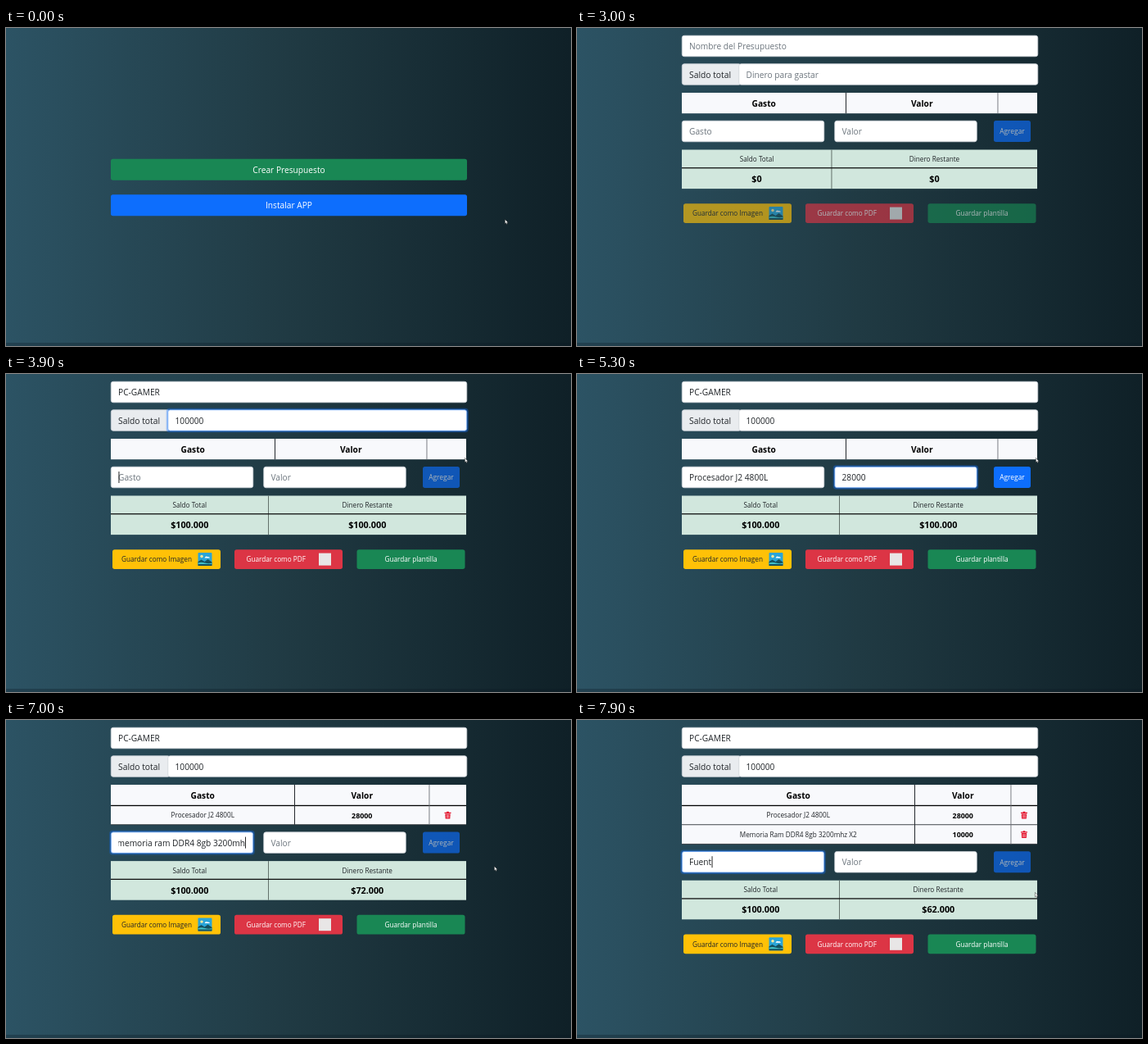
An HTML page for the animation above (8 s loop, 690 by 388 pixels).

```html
<!DOCTYPE html>
<html lang="es">
<head>
<meta charset="utf-8">
<title>Presupuesto</title>
<style>
html, body { margin: 0; width: 100%; height: 100%; overflow: hidden; background: #203a43; }
svg { display: block; width: 690px; height: 388px; font-family: "Open Sans", "Noto Sans", sans-serif; }
</style>
</head>
<body>
<svg id="stage" viewBox="0 0 690 388">
  <defs>
    <linearGradient id="bg">
      <stop offset="0" stop-color="#2c5364"/>
      <stop offset=".5" stop-color="#203a43"/>
      <stop offset="1" stop-color="#0f2027"/>
    </linearGradient>
  </defs>
  <rect width="690" height="388" fill="url(#bg)"/>
  <rect y="384" width="690" height="4" fill="#0b1a22" opacity=".3"/>
  <g id="view"></g>
</svg>
<script>
const LOOP = 8000, STEP = 100;
const BODY = 10.2, SMALL = 8.2, INK = '#212529', HINT = '#6c757d';
const LEFT = 128, RIGHT = 562, ROW_H = 23.6;
const view = document.getElementById('view');
const pen = document.createElement('canvas').getContext('2d');

// time, x, y of the pointer
const pointerPath = [
  [300, 610, 235], [1200, 338, 175], [1500, 338, 175], [1900, 330, 177], [3000, 330, 177],
  [3500, 480, 60], [3800, 561, 104], [5300, 561, 104], [5600, 533, 131 ], [5700, 533, 131],
  [6000, 597, 180], [7200, 597, 180], [7400, 533, 154], [7500, 533, 154], [7900, 560, 212]
];
const focusSteps = [
  [3100, 'name'], [3500, 'total'], [3900, 'item'], [5000, 'cost'],
  [5700, 'item'], [7200, 'cost'], [7500, 'item']
];
const entries = [
  { item: 'Procesador J2 4800L', from: 4100, to: 4900, cost: 28000, costFrom: 5100, costTo: 5300, added: 5700 },
  { item: 'memoria ram DDR4 8gb 3200mhz X2', from: 6500, to: 7075, cost: 10000, costFrom: 7200, costTo: 7400, added: 7500 },
  { item: 'Fuent', from: 7500, to: 7900, cost: '', costFrom: 8000, costTo: 8100, added: 9000 }
];
// column borders of the expense table for 0, 1 and 2 rows
const columns = [[328.5, 514], [352.5, 517], [412.5, 530]];

const clamp = v => Math.max(0, Math.min(1, v));
const typed = (text, t, a, b) => {
  const s = String(text);
  return s.slice(0, Math.round(clamp((t - a) / (b - a)) * s.length));
};
const money = n => '$' + String(n).replace(/\B(?=(\d{3})+$)/g, '.');
const capitalize = s => s.replace(/(^| )[a-z]/g, c => c.toUpperCase());
const focusAt = t => focusSteps.reduce((f, [at, id]) => t >= at ? id : f, '');

function pointerAt(t) {
  const i = pointerPath.findIndex(p => p[0] > t);
  if (i < 0) return pointerPath[pointerPath.length - 1].slice(1);
  if (i === 0) return pointerPath[0].slice(1);
  const [ta, xa, ya] = pointerPath[i - 1], [tb, xb, yb] = pointerPath[i];
  const k = (t - ta) / (tb - ta), e = k * k * (3 - 2 * k);
  return [xa + (xb - xa) * e, ya + (yb - ya) * e];
}

const rect = (x, y, w, h, fill, more = '') =>
  `<rect x="${x}" y="${y}" width="${w}" height="${h}" fill="${fill}" ${more}/>`;

const text = (s, x, cy, size, fill = INK, anchor = 'middle', weight = 400) =>
  `<text x="${x}" y="${cy + size * 0.4}" font-size="${size}" fill="${fill}" text-anchor="${anchor}" font-weight="${weight}">${s}</text>`;

const bold = (s, x, cy, size) => text(s, x, cy, size, '#000', 'middle', 700);

function button(x, y, w, h, fill, label, size, ink = '#fff', on = true, labelX = x + w / 2, icon = '') {
  return `<g opacity="${on ? 1 : 0.65}">${rect(x, y, w, h, fill, 'rx="2.7"')}${text(label, labelX, y + h / 2, size, ink)}${icon}</g>`;
}

function field(x, y, w, value, hint, ring, caret) {
  const h = 26, pad = 9, end = x + w - pad - 1;
  pen.font = `${BODY}px "Open Sans", "Noto Sans", sans-serif`;
  const width = pen.measureText(value).width;
  const over = x + pad + width > end;
  const caretX = over ? end : x + pad + width + 0.5;
  let out = '';
  if (ring) out += rect(x - 1.8, y - 1.8, w + 3.6, h + 3.6, '#0d6efd', 'rx="4" opacity=".35"');
  out += rect(x + .25, y + .25, w - .5, h - .5, '#fff', `rx="2.7" stroke="${ring ? '#5e9cf5' : '#ced4da'}" stroke-width=".8"`);
  const line = value
    ? text(value, (over ? end : x + pad) - x - pad, h / 2, BODY, INK, over ? 'end' : 'start')
    : text(hint, 0, h / 2, BODY, HINT, 'start');
  out += `<svg x="${x + pad}" y="${y}" width="${w - 2 * pad}" height="${h}" overflow="hidden">${line}</svg>`;
  if (caret) out += rect(caretX, y + 6, 0.9, 14, '#111');
  return out;
}

const trash = (cx, cy) =>
  `<g transform="translate(${cx - 4} ${cy - 4.5})" fill="#e3122b">
    <path d="M0 1.2H2.6V.2H5.4V1.2H8V2.4H0Z"/>
    <path d="M.8 3H7.2L6.8 9H1.2Z"/>
    <path d="M2.7 4V8M4 4V8M5.3 4V8" stroke="#fff" stroke-width=".5"/>
  </g>`;

const picture = (x, y) =>
  `<g transform="translate(${x} ${y})">
    <rect width="17" height="16" rx="1" fill="#2aa5d8"/>
    <path d="M0 16V11L4 8.5 8 11 12 8 17 11.5V16Z" fill="#15505f"/>
    <path d="M0 12.5Q4 11 8.5 12.5T17 12.5V14H0Z" fill="#3fc0c9"/>
    <circle cx="4.5" cy="4.5" r="1.7" fill="#ffe9a0"/>
    <path d="M8 6.5Q9.5 3.5 11.5 5 14 4.5 14.5 6.5Z" fill="#fff"/>
  </g>`;

function home(t, [px, py]) {
  const hover = px > LEFT && px < 563 && py > 160 && py < 186;
  const focused = t >= 2000;
  return (focused ? rect(127, 158.6, 437, 28.4, '#3c996e', 'rx="3.5" opacity=".5"') : '')
    + button(LEFT, 159.7, 435, 26, focused ? '#146c43' : hover ? '#157347' : '#198754', 'Crear Presupuesto', BODY)
    + button(LEFT, 203.3, 435, 26, '#0d6efd', 'Instalar APP', BODY);
}

function expenses(rows) {
  const [a, b] = columns[rows.length];
  const top = 79, head = 104.2, bottom = head + rows.length * ROW_H;
  let out = rect(LEFT, top, RIGHT - LEFT, bottom - top, '#f8f9fc');
  out += bold('Gasto', (LEFT + a) / 2, 91.6, BODY) + bold('Valor', (a + b) / 2, 91.6, BODY);
  rows.forEach((r, i) => {
    const cy = head + (i + 0.5) * ROW_H;
    out += text(capitalize(r.item), (LEFT + a) / 2, cy, SMALL)
      + bold(r.cost, (a + b) / 2, cy, 8.9) + trash((b + RIGHT) / 2, cy)
      + rect(LEFT, head + (i + 1) * ROW_H - .5, RIGHT - LEFT, .9, '#30353a');
  });
  if (rows.length) out += rect(LEFT, head - .4, RIGHT - LEFT, 1.3, '#000');
  return out + rect(a - .5, top, 1, bottom - top, '#25292d') + rect(b - .5, top, .9, bottom - top, '#6c7177');
}

function totals(y, total, left) {
  const sep = 311 + 9.5 * Math.min(1, (String(total).length - 1) / 5);
  const c1 = (LEFT + sep) / 2, c2 = (sep + RIGHT) / 2;
  return rect(LEFT, y, RIGHT - LEFT, 47.6, '#d1e7dd')
    + rect(sep - .5, y, .9, 47.6, '#56645e')
    + rect(LEFT, y + 21.6, RIGHT - LEFT, 1.3, '#111')
    + text('Saldo Total', c1, y + 11.2, SMALL) + text('Dinero Restante', c2, y + 11.2, SMALL)
    + bold(money(total), c1, y + 35.4, 10.8) + bold(money(left), c2, y + 35.4, 10.8);
}

function budget(t, [px, py]) {
  const rows = entries.filter(e => t >= e.added);
  const now = entries[rows.length];
  const item = typed(now.item, t, now.from, now.to);
  const cost = typed(now.cost, t, now.costFrom, now.costTo);
  const name = typed('PC-GAMER', t, 3100, 3400);
  const saldo = typed(100000, t, 3500, 3800);
  const total = Number(saldo), left = rows.reduce((n, r) => n - r.cost, total);
  const ring = focusAt(t - STEP), caret = t % 1000 < 300 || t % 1000 >= 500 ? focusAt(t) : '';
  const dy = rows.length * ROW_H, y = 113 + dy, saveY = 214.2 + dy;
  const input = (id, x, fy, w, value, hint) => field(x, fy, w, value, hint, ring === id, caret === id);
  const hover = px > 509 && px < 554 && py > y && py < y + 26;
  const ready = item && cost, on = total > 0;

  return input('name', LEFT, 9, 435, name, 'Nombre del Presupuesto')
    + rect(128.3, 43.8, 72, 25.5, '#e9ecef', 'rx="2.7" stroke="#ced4da" stroke-width=".8"')
    + text('Saldo total', 137, 56.8, 10.3, INK, 'start')
    + input('total', 197.5, 43.5, 365.5, saldo, 'Dinero para gastar')
    + expenses(rows)
    + input('item', LEFT, y, 174, item, 'Gasto')
    + input('cost', 314.5, y, 174, cost, 'Valor')
    + button(509, y, 45, 26, ready && hover ? '#0b5ed7' : '#0d6efd', 'Agregar', 8.4, '#fff', ready)
    + totals(148.5 + dy, total, left)
    + button(130, saveY, 132, 23.8, '#ffc107', 'Guardar como Imagen', SMALL, INK, on, 184, picture(234.5, saveY + 3.8))
    + button(279, saveY, 132, 23.8, '#dc3545', 'Guardar como PDF', SMALL, '#fff', on, 329.7,
        rect(382, saveY + 4.4, 15, 15, '#e8e6e6'))
    + button(428.5, saveY, 132, 23.8, '#198754', 'Guardar plantilla', SMALL, '#fff', on);
}

const arrow = ([x, y]) =>
  `<path transform="translate(${x - .6} ${y - 1.6})" d="M0 0V5.4L1.2 4.4 2 6.1 2.9 5.7 2.2 4H3.8Z" fill="#fff" stroke="#111" stroke-width=".4"/>`;

function draw(t) {
  const p = pointerAt(t);
  const hidden = t >= 3000 && t < 3800;
  view.innerHTML = (t < 2100 ? home(t, p) : budget(t, p)) + (hidden ? '' : arrow(p));
}

const start = performance.now();
let last = -1;
function tick() {
  const t = Math.floor(((performance.now() - start) % LOOP) / STEP) * STEP;
  if (t !== last) draw(last = t);
  requestAnimationFrame(tick);
}
tick();
</script>
</body>
</html>
```
